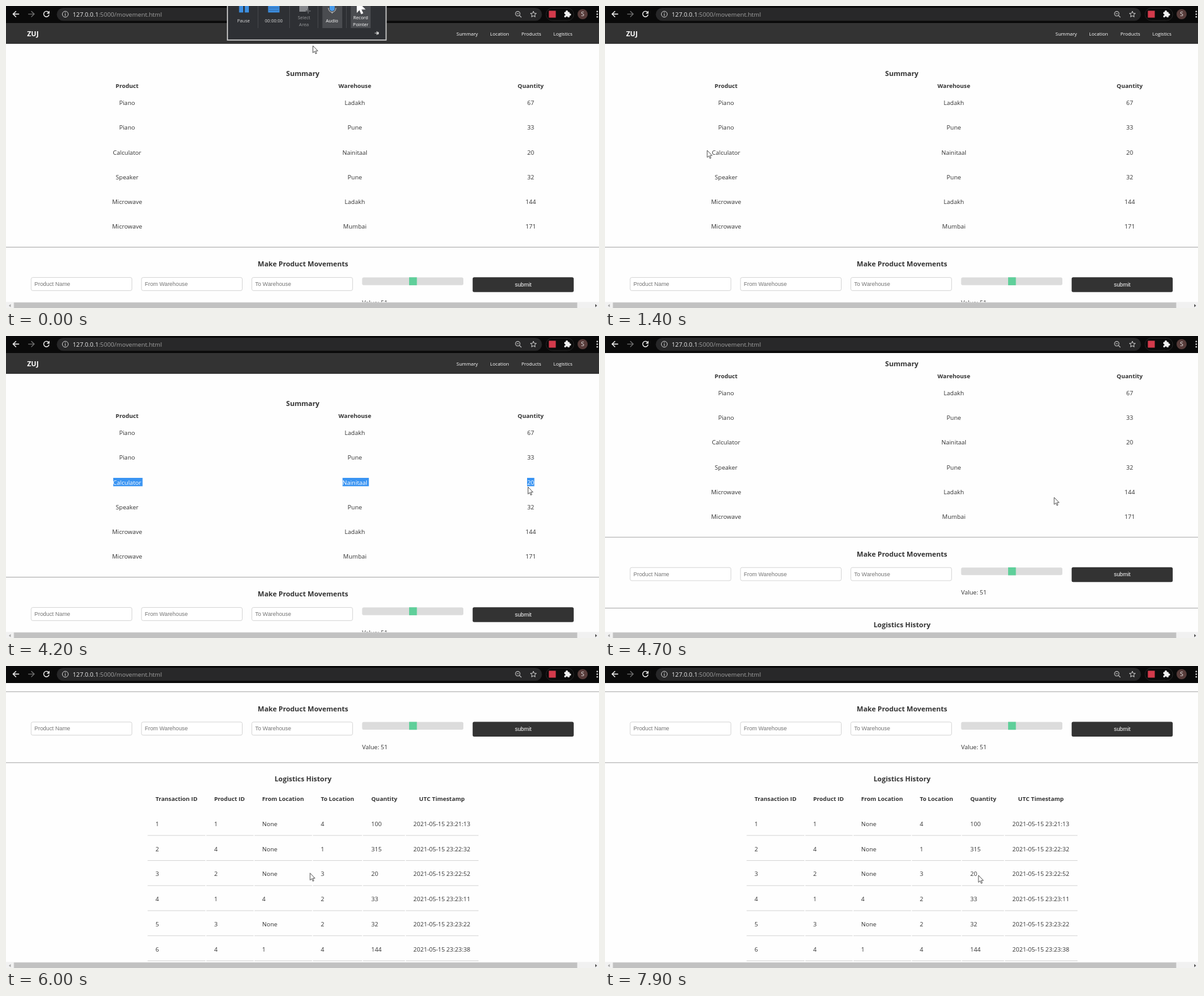
Animation, 940 px wide and 479 px high, one loop 8000 ms. Source, as an HTML page:

```html
<!DOCTYPE html>
<html lang="en">
<head>
<meta charset="utf-8">
<title>Inventory page</title>
<style>
  html, body { margin: 0; width: 100%; height: 100%; overflow: hidden; background: #fefefe; }
  svg { display: block; font-family: "Open Sans", "Noto Sans", sans-serif; font-size: 9.55px; }
  text { white-space: pre; }
  .h { font-size: 11px; font-weight: 700; }
  .th { font-size: 9.25px; font-weight: 700; }
  .nav { font-size: 7.6px; }
  .url { font-size: 9.7px; }
  .form { font-family: "Liberation Sans", Arial, sans-serif; font-size: 8.9px; }
  .rec { font-size: 7.2px; }
</style>
</head>
<body>
<svg id="stage" width="940" height="479" viewBox="0 0 940 479"></svg>
<script>
const LOOP = 8000, STEP = 100;
const INK = '#333', BLUE = '#3a94f2';

const text = (x, y, s, cls = '', fill = INK, anchor = 'middle') =>
  `<text x="${x}" y="${y}" class="${cls}" fill="${fill}" text-anchor="${anchor}">${s}</text>`;
const left = (x, y, s, cls, fill) => text(x, y, s, cls, fill, 'start');
const rect = (x, y, w, h, fill, r = 0, more = '') =>
  `<rect x="${x}" y="${y}" width="${w}" height="${h}" rx="${r}" fill="${fill}" ${more}/>`;
const circle = (x, y, r, fill, more = '') =>
  `<circle cx="${x}" cy="${y}" r="${r}" fill="${fill}" ${more}/>`;
const path = (d, fill, more = '') => `<path d="${d}" fill="${fill}" ${more}/>`;
const line = (d, color, w = 1) => path(d, 'none', `stroke="${color}" stroke-width="${w}"`);

// Stock summary
const stockX = [192, 553, 831.7];
const stock = ['Piano Ladakh 67', 'Piano Pune 33', 'Calculator Nainitaal 20',
  'Speaker Pune 32', 'Microwave Ladakh 144', 'Microwave Mumbai 171'].map(r => r.split(' '));
const stockRow = (i, fill) =>
  stock[i].map((s, c) => text(stockX[c], 157.2 + 39.25 * i, s, '', fill)).join('');

function summary() {
  const nav = [[714, 'Summary'], [767.3, 'Location'], [817, 'Products'], [867.7, 'Logistics']];
  return rect(0, 26, 940, 34, INK) +
    left(33.5, 48, 'ZUJ', 'h', '#fff') +
    nav.map(([x, s]) => left(x, 46.8, s, 'nav', '#fff')).join('') +
    text(470.5, 111.3, 'Summary', 'h') +
    ['Product', 'Warehouse', 'Quantity'].map((s, i) => text(stockX[i], 130.3, s, 'th')).join('') +
    stock.map((_, i) => stockRow(i)).join('') +
    `<g id="selection" clip-path="url(#picked)">` +
    [[170, 46.5], [533.5, 41.7], [826, 11.5]].map(([x, w]) => rect(x, 225, w, 13.3, BLUE)).join('') +
    stockRow(2, '#fff') + '</g>';
}

function form() {
  const fields = ['Product Name', 'From Warehouse', 'To Warehouse'];
  return rect(0, 382, 940, 1, '#a9a9a9') +
    text(470.8, 413.3, 'Make Product Movements', 'h') +
    fields.map((s, i) => rect(39.9 + 174.9 * i, 430.6, 159.7, 20.8, '#fff', 2.5, 'stroke="#d2d2d2" stroke-width=".9"') +
      left(45 + 175 * i, 443.9, s, 'form', '#757575')).join('') +
    rect(564.5, 430.5, 160.5, 12.2, '#dcdcdc', 2.5) +
    rect(639, 430.3, 12.3, 12.6, '#5fcf9a') +
    left(564.5, 473.6, 'Value: 51') +
    rect(739.7, 430.2, 160.2, 23.5, INK, 2.5) +
    text(819.8, 444.8, 'submit', 'form', '#fff') +
    rect(0, 494.5, 940, 1, '#a9a9a9');
}

function history() {
  const x = [237, 330, 406, 499, 579, 645.8];
  const heads = ['Transaction ID', 'Product ID', 'From Location', 'To Location', 'Quantity'];
  const rules = [[224.5, 316], [317.5, 392.5], [394, 485], [486.5, 564.5], [566, 632.5], [634, 749]];
  const moves = ['1 None 4 100 21:13', '4 None 1 315 22:32', '2 None 3 20 22:52',
    '1 4 2 33 23:11', '3 None 2 32 23:22', '4 1 4 144 23:38'];
  const under = rules.map(([a, b]) => `M${a} 0H${b}`).join('');
  return text(470.8, 525.2, 'Logistics History', 'h') +
    heads.map((s, i) => left(x[i], 556.2, s, 'th')).join('') +
    text(691, 556.2, 'UTC Timestamp', 'th') +
    moves.map((m, i) => {
      const cells = [i + 1, ...m.split(' ')], y = 595.7 + 39.75 * i;
      cells[5] = '2021-05-15 23:' + cells[5];
      return cells.map((s, c) => left(x[c], y, s)).join('') +
        `<g transform="translate(0 ${610.5 + 39.75 * i})">${line(under, '#d6d6d6')}</g>`;
    }).join('');
}

function browserBar() {
  const star = Array.from({ length: 10 }, (_, i) => {
    const a = i * Math.PI / 5, r = i % 2 ? 2.2 : 5;
    return `${836 + r * Math.sin(a)} ${13.3 - r * Math.cos(a)}`;
  });
  const arrow = (x, d) => `M${x - 4.8 * d} 12.8H${x + 4.8 * d}M${x} 8.2l${4.8 * d} 4.6l${-4.8 * d} 4.6`;
  return rect(0, 0, 940, 27, '#0a0a0a') +
    rect(80.5, 3, 769, 20.5, '#282829', 10.2) +
    line(arrow(16, -1), '#eee', 1.4) + line(arrow(40, 1), '#707070', 1.3) +
    line('M67.6 10.2A4.3 4.3 0 1 0 68.3 13.6', '#eee', 1.4) + path('M69 7.6V12.2H64.4z', '#eee') +
    circle(94, 13, 4.7, 'none', 'stroke="#ccc"') + line('M94 12.3V15.8M94 10V11.2', '#ccc', 1.1) +
    left(105.8, 16.7, '127.0.0.1<tspan fill="#a0a0a0">:5000/movement.html</tspan>', 'url', '#eee') +
    circle(811.2, 12.2, 3.6, 'none', 'stroke="#bbb" stroke-width="1.1"') +
    line('M813.8 14.8L817 18M809.4 12.2H813', '#bbb', 1.1) +
    path(`M${star.join('L')}z`, 'none', 'stroke="#ccc"') +
    rect(856, 3.5, 44, 19.5, '#0a0a0a', 9.7, 'stroke="#262626"') +
    rect(860.5, 7.5, 11, 11, '#d23a4b') +
    rect(885, 9.5, 8.4, 8.5, '#f2f2f2', 1) + circle(889, 9, 1.9, '#f2f2f2') +
    circle(893.8, 13.6, 1.9, '#f2f2f2') + circle(885.3, 13.9, 1.4, '#0a0a0a') + circle(889, 17.8, 1.4, '#0a0a0a') +
    circle(914, 13, 8, '#573c3a') + text(914, 16.3, 'S', '', '#eee') +
    [8.8, 13, 17.2].map(y => circle(937.2, y, 1.2, '#ddd')).join('');
}

const scrollBar = () =>
  rect(0, 469.5, 940, 10, '#f1f1f1') + rect(12.5, 470.3, 893, 8.7, '#c1c1c1') +
  path('M7.5 472.7V477.7L4.5 475.2z', '#a3a3a3') + path('M934 472.7V477.7L937 475.2z', '#505050');

const pointer = 'M0 0V11.2L2.6 8.8L4.3 12.8L6 12.1L4.3 8.2H7.8z';

function recorder() {
  const label = (x, y, s, fill = '#d8d8d8') => text(x, y, s, 'rec', fill);
  return rect(351, -30, 251.5, 84, '#2e3034', 0, 'stroke="#c9c9c9" stroke-width="1.7"') +
    line('M399.5 0V35M449.5 0V35M494.5 0V35M539.5 0V35', '#45474b') +
    rect(501.5, -10, 31.5, 45, '#4a4c50') + rect(546.5, -10, 31.5, 45, '#4a4c50') +
    rect(369.5, -10, 6.5, 20.3, '#3c8ee0') + rect(378.5, -10, 6.5, 20.3, '#3c8ee0') +
    rect(415.5, -10, 18, 20.3, '#3c8ee0') + line('M417 3H432M417 7H432', '#2e5f96', .8) +
    rect(465, -10, 14, 19, '#85878b') + line('M479 4V12M475 8H483', '#55575b', 2) +
    rect(513, -12, 8, 20, '#479aea', 4) + line('M511 3A6 7 0 0 0 523 3M517 9.5V12', '#c8c8c8') +
    path('M556 -9V11L560.3 6.5L563 13L566.3 11.5L563.5 5.5H570z', '#fff') +
    label(376.5, 26.2, 'Pause') + label(424.5, 26.2, '00:00:00') + label(516.8, 26.2, 'Audio', '#fff') +
    label(472.3, 21.2, 'Select', '#97999c') + label(472.3, 32, 'Area', '#97999c') +
    label(562.3, 21.2, 'Record', '#fff') + label(562.3, 32, 'Pointer', '#fff') +
    line('M584.5 43H588', '#ccc') + rect(588, 41.3, 3, 3.5, '#ccc') + line('M588 40V46', '#ccc');
}

const $ = id => document.getElementById(id);
$('stage').innerHTML =
  `<defs><clipPath id="picked"><rect id="reach" x="169" y="220" width="0" height="24"/></clipPath></defs>` +
  rect(0, 0, 940, 479, '#fefefe') +
  `<g id="page">${summary()}${form()}${history()}</g>` +
  browserBar() + scrollBar() +
  `<g id="recorder">${recorder()}</g>` +
  path(pointer, '#fff', 'id="cursor" stroke="#444" stroke-width=".9"');

// Keys are [time, ...values], joined by straight moves.
function track(keys, t) {
  const i = keys.findIndex(k => k[0] > t);
  if (i < 0) return keys[keys.length - 1].slice(1);
  if (i === 0) return keys[0].slice(1);
  const a = keys[i - 1], b = keys[i], p = (t - a[0]) / (b[0] - a[0]);
  return a.slice(1).map((v, n) => v + (b[n + 1] - v) * p);
}

const cursorKeys = [[0, 486.5, 63], [200, 480, 66], [1200, 162, 229], [1500, 162, 229], [1900, 169, 230],
  [3100, 610.5, 230], [3800, 838, 236], [4200, 827.5, 239.5], [4700, 712, 256],
  [5400, 560, 352], [6000, 482, 328.5], [7000, 530, 329], [7900, 592, 332]];
const reachKeys = [[1900, 169], [3100, 564.8], [3800, 838]];
const scrollKeys = [[4552, 0], [5350, 341.7]];
const recorderKeys = [[0, 0], [400, -58]];

function draw(t) {
  const move = (id, x, y) => $(id).setAttribute('transform', `translate(${x} ${y})`);
  move('cursor', ...track(cursorKeys, t));
  move('page', 0, -track(scrollKeys, t)[0]);
  move('recorder', 0, track(recorderKeys, t)[0]);
  $('reach').setAttribute('width', t < 4500 ? track(reachKeys, t)[0] - 169 : 0);
}

const start = performance.now();
function frame() {
  const t = (performance.now() - start) % LOOP;
  draw(Math.floor(t / STEP) * STEP);
  requestAnimationFrame(frame);
}
frame();
</script>
</body>
</html>
```
